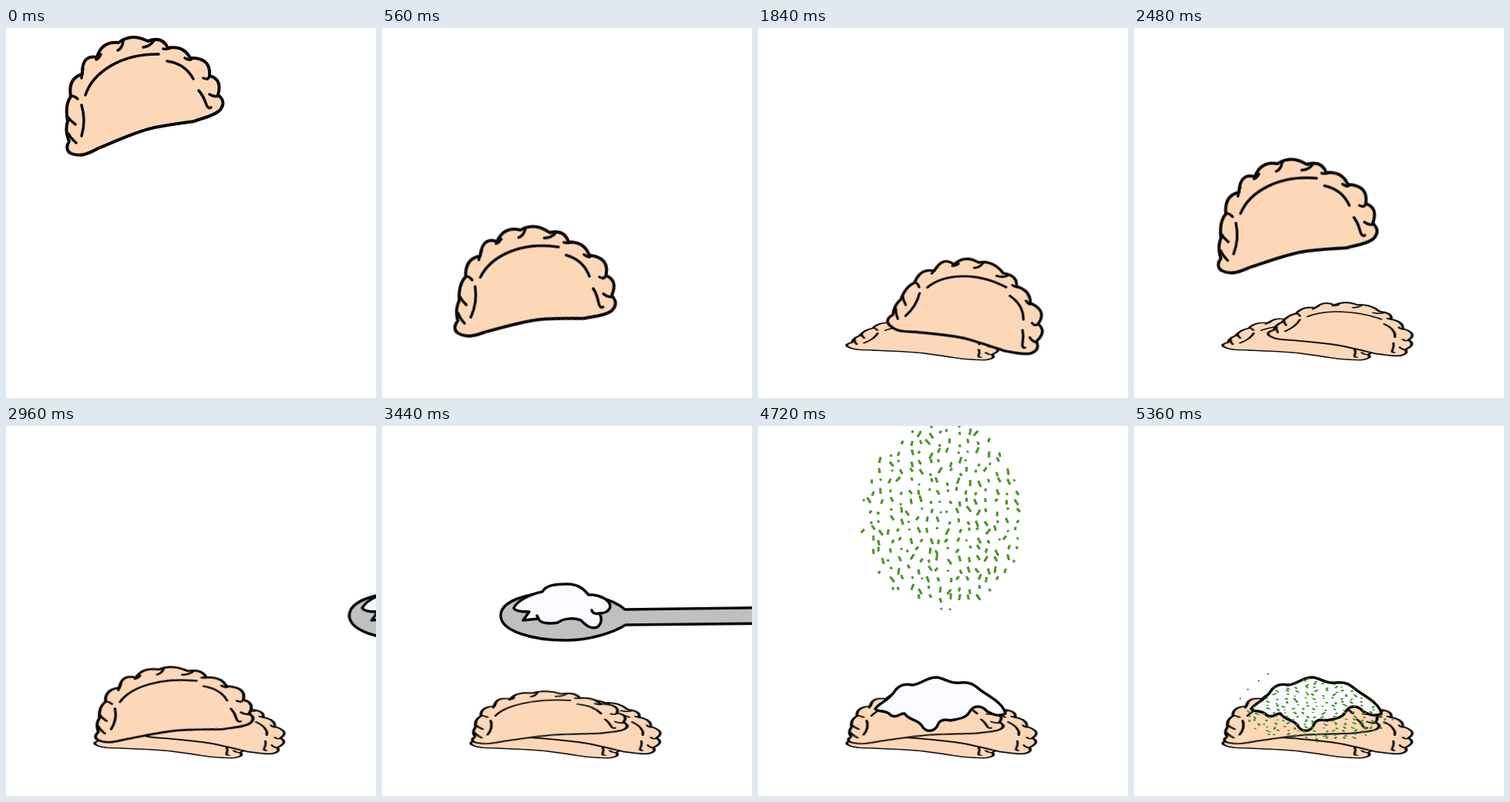
An HTML page for the animation above (5440 ms loop, 480 by 480 pixels).

```html
<!DOCTYPE html>
<html lang="en">
<head>
<meta charset="utf-8">
<title>Dumplings</title>
<style>
html, body { margin: 0; width: 100%; height: 100%; overflow: hidden; background: #fff; }
svg { display: block; width: 100vw; height: 100vh; }
.ink { stroke: #080808; stroke-linecap: round; stroke-linejoin: round; }
.line { fill: none; }
.dough { fill: #fcd8b9; stroke-width: 4; }
.steel { fill: #c0c0c0; stroke-width: 3.5; }
.cream { fill: #f9fbfe; stroke-width: 3.5; }

/* 68 poses of 80 ms; steps() keeps each pose still */
.act { animation: 5440ms infinite; }
#first { animation-name: first; }
#second { animation-name: second; }
#third { animation-name: third; }
#spoon { animation-name: spoon; }
#scoop { animation-name: scoop; }
#topping { animation-name: topping; transform-box: fill-box; transform-origin: center; }
#shower { animation-name: shower; }
#falling { animation-name: falling; }
#settled { animation-name: settled; }

@keyframes first {
  0% { transform: translate(180px, 100px) scale(1, 1) rotate(0deg); animation-timing-function: steps(7); }
  10.294% { transform: translate(202px, 347px) scale(1, 1) rotate(8deg); animation-timing-function: steps(6); }
  19.117%, 100% { transform: translate(221.5px, 410.5px) scale(.92, .375) rotate(29deg); }
}
@keyframes second {
  0% { opacity: 0; animation-timing-function: step-end; }
  20.588% { opacity: 1; transform: translate(297.5px, 99.5px) scale(1, 1) rotate(46.8deg); animation-timing-function: steps(7); }
  30.882% { transform: translate(294px, 349px) scale(1, 1) rotate(42deg); animation-timing-function: steps(2); }
  33.823% { transform: translate(277px, 377.5px) scale(.94, .84) rotate(29deg); animation-timing-function: steps(3); }
  38.235%, 100% { transform: translate(275.8px, 398.5px) scale(.88, .455) rotate(33deg); }
}
@keyframes third {
  0% { opacity: 0; animation-timing-function: step-end; }
  38.235% { opacity: 1; transform: translate(199px, 100px) scale(1, 1) rotate(-4deg); animation-timing-function: steps(8); }
  50% { transform: translate(223px, 355px) scale(1, 1) rotate(9.3deg); animation-timing-function: steps(5); }
  57.352%, 100% { transform: translate(220px, 386px) scale(.97, .47) rotate(6deg); }
}
@keyframes spoon {
  0% { transform: translate(340px, 0); animation-timing-function: step-end; }
  52.941% { transform: translate(340px, 0); animation-timing-function: steps(7); }
  63.235% { transform: translate(0, 0); animation-timing-function: step-end; }
  64.705% { transform: translate(-14px, -20px); animation-timing-function: steps(2); }
  67.647% { transform: translate(-14px, -30px); animation-timing-function: step-end; }
  75% { transform: translate(-14px, -30px); animation-timing-function: steps(6); }
  83.823%, 100% { transform: translate(360px, -30px); }
}
@keyframes scoop {
  0% { opacity: 1; animation-timing-function: step-end; }
  66.176%, 100% { opacity: 0; }
}
@keyframes topping {
  0% { opacity: 0; animation-timing-function: step-end; }
  66.176% { opacity: 1; transform: translate(-10px, -140px) scale(.72, .8); animation-timing-function: steps(4); }
  72.058%, 100% { transform: translate(0, 0) scale(1, 1); }
}
@keyframes shower {
  0% { opacity: 0; animation-timing-function: step-end; }
  83.823% { opacity: 1; transform: translate(240px, 50px) scale(1.1, 1.1); animation-timing-function: steps(2); }
  86.764% { transform: translate(240px, 118px) scale(1, 1); animation-timing-function: steps(4); }
  92.647% { transform: translate(240px, 253px) scale(1, .83); animation-timing-function: steps(4); }
  98.529%, 100% { transform: translate(240px, 366px) scale(1, .37); }
}
@keyframes falling {
  0% { opacity: 1; animation-timing-function: step-end; }
  98.529%, 100% { opacity: 0; }
}
@keyframes settled {
  0% { opacity: 0; animation-timing-function: step-end; }
  98.529%, 100% { opacity: 1; }
}
</style>
</head>
<body>
<svg viewBox="0 0 480 480">
  <defs>
    <g id="dumpling" class="ink" transform="translate(-180 -100)">
      <path class="dough" d="M82 147Q76 133 80 121Q76 100 84 89Q80 65 99 60Q98 34 118 38Q124 17 146 19Q162 6 184 17Q203 10 210 26Q230 22 239 39Q266 38 264 62Q281 66 275 87Q286 95 278 106C272 113 258 116 244 121C225 124 205 126 185 131C160 138 140 148 120 156C108 162 98 168 85 163C78 160 78 153 82 147Z"/>
      <path class="line" stroke-width="3.5" d="M79 114Q83 120 90 125M81 137Q84 143 91 149M84 88Q89 88 93 92M100 53Q98 58 98 65M123 34Q121 39 117 41M152 17Q151 26 145 29M192 16Q187 24 178 25M214 25Q210 28 204 27M241 40Q239 43 232 39M264 62Q263 68 256 65M277 88Q270 90 264 86"/>
      <path class="line" stroke-width="3.5" d="M98 100Q104 120 98 140M103 87C113 57 150 33 198 34M209 43Q232 46 243 66M250 81Q256 88 259 97T266 103"/>
    </g>
    <path id="mound" d="M152 367C156 360 168 357 176 346C181 337 190 334 200 336C212 335 218 326 232 326C244 328 250 335 262 333C278 331 282 338 292 345C302 352 318 360 321 373C312 378 304 374 297 370C290 362 280 362 275 370C270 380 258 380 250 382C240 380 236 382 234 386C230 397 218 399 212 388C206 380 196 382 190 373C184 372 180 380 172 375C166 368 158 372 152 367Z"/>
    <g id="herbs" class="line">
      <path id="edges" stroke="#1d4d08" stroke-width="2.8"/>
      <path id="leaves" stroke="#4fb51c" stroke-width="1.7"/>
    </g>
    <clipPath id="pile">
      <use href="#mound"/>
      <path d="M120 410L135 378L152 365L320 372L350 386L362 412Z"/>
    </clipPath>
  </defs>

  <g id="first" class="act"><use href="#dumpling"/></g>
  <g id="second" class="act"><use href="#dumpling"/></g>
  <g id="third" class="act"><use href="#dumpling"/></g>

  <g id="spoon" class="act ink">
    <path class="steel" d="M315 238C300 224 265 216 230 216C185 216 154 228 154 246C154 266 195 278 238 278C270 278 300 268 316 258L700 254V233Z"/>
    <g id="scoop" class="act">
      <path class="cream" d="M208 215C213 206 226 205 240 205C255 205 262 212 268 219C280 218 297 225 296 235C294 241 288 243 282 243C286 249 285 257 279 261C271 264 265 259 258 252C247 248 235 250 228 255C217 257 205 256 203 250L183 252L191 241C182 241 172 240 171 236C174 229 188 219 208 215Z"/>
      <path class="line" stroke-width="3.5" d="M282 243Q274 245 272 239M203 250L201 246"/>
    </g>
  </g>

  <g id="topping" class="act ink"><use href="#mound" class="cream"/></g>

  <g id="falling" class="act">
    <g id="shower" class="act"><use href="#herbs"/></g>
  </g>
  <g id="settled" class="act">
    <g clip-path="url(#pile)"><use href="#herbs" transform="translate(240 366) scale(1 .37)"/></g>
    <path d="M173 321h1.5v1.5h-1.5zM161 330h1.5v1.5h-1.5zM147 341h1.5v1.5h-1.5zM137 353h1.5v1.5h-1.5z"/>
  </g>
</svg>
<script>
let seed = 7;
const rand = () => (seed = seed * 16807 % 2147483647) / 2147483647;
const spread = size => (rand() - .5) * size;

// Short chopped stalks on a jittered grid inside an oval
function chop(rx, ry, gap) {
  let d = '';
  for (let gy = -ry; gy <= ry; gy += gap) {
    for (let gx = -rx; gx <= rx; gx += gap) {
      const x = gx + spread(7), y = gy + spread(8);
      const tilt = spread(1.5), half = 1 + rand() * 3.4;
      if ((x / rx) ** 2 + (y / ry) ** 2 > 1) continue;
      const dx = Math.sin(tilt) * half, dy = Math.cos(tilt) * half;
      d += `M${(x - dx).toFixed(1)} ${(y - dy).toFixed(1)}l${(2 * dx).toFixed(1)} ${(2 * dy).toFixed(1)}`;
    }
  }
  return d;
}

const stalks = chop(106, 121, 12.6);
for (const id of ['edges', 'leaves']) document.getElementById(id).setAttribute('d', stalks);
</script>
</body>
</html>
```
